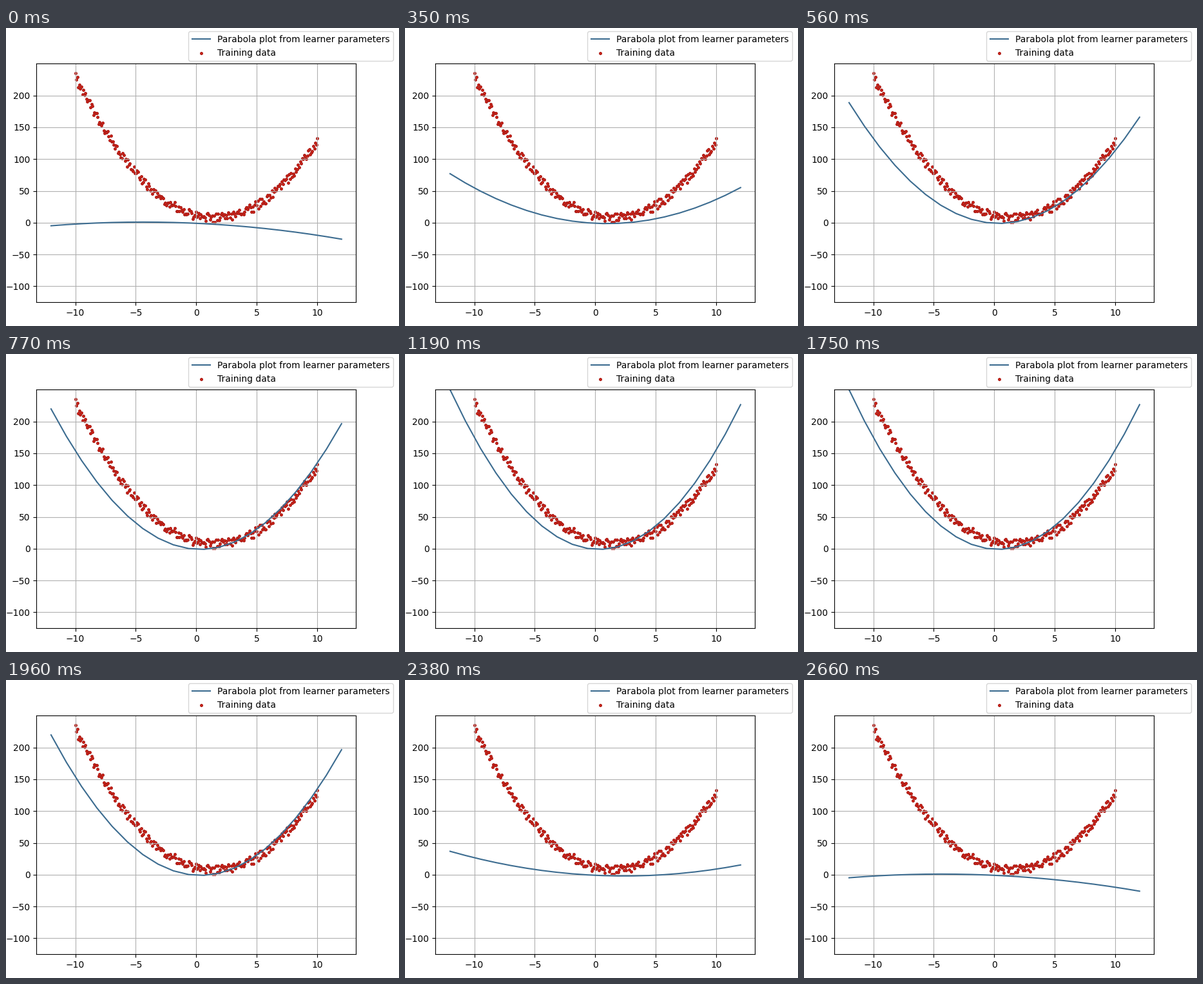
Write a matplotlib script that moves like this. It is 610 px wide and 462 px high and loops after 2730 ms.

```python
import numpy as np
import matplotlib.pyplot as plt
from matplotlib.animation import FuncAnimation

W, H, DPI = 610, 462, 100
FRAMES, INTERVAL = 39, 70
BLUE, RED, DARK_RED = "#3c6c90", "#cc2214", "#a81c1a"


def learning_step(n):
    """Learn forward with one pause, then rewind: fast first, slower later."""
    forward = n if n < 10 else n - 1
    rewind = max(38 - n, 2 * (33 - n))
    return min(forward, rewind)


def parabola(x, n):
    step = learning_step(n)
    growth = step ** 4.45 / (step ** 4.45 + 5.93 ** 4.45)
    a = -0.1 + 1.54 * growth + 0.015 * step
    b = -0.885 - 0.055 * a
    return a * x ** 2 + b * x - 1


def training_data(count=240):
    rng = np.random.default_rng(4)
    x = np.linspace(-10, 10, count)
    noise = rng.uniform(-7.3, 7.3, count)
    return x, 1.67 * x ** 2 - 5.05 * x + 11 + noise


fig = plt.figure(figsize=(W / DPI, H / DPI), dpi=DPI, facecolor="white")
ax = fig.add_axes([47.4 / W, 37 / H, 496 / W, 369.6 / H])
ax.set_xlim(-13.2, 13.2)
ax.set_ylim(-125, 250)
ax.set_xticks(range(-10, 11, 5))
ax.set_yticks(range(-100, 201, 50))
ax.grid(True)

xs = np.linspace(-12, 12, 20)
line, = ax.plot(xs, parabola(xs, 0), color=BLUE, lw=1.5,
                label="Parabola plot from learner parameters")
ax.scatter(*training_data(), s=8, color=RED, edgecolors=DARK_RED,
           linewidths=0.7, label="Training data")
ax.legend(loc="upper right", bbox_to_anchor=(601 / W, 457 / H),
          bbox_transform=fig.transFigure, borderaxespad=0)


def update(n):
    line.set_ydata(parabola(xs, n))
    return line,


anim = FuncAnimation(fig, update, frames=FRAMES, interval=INTERVAL,
                     repeat=True, repeat_delay=0)
plt.show()
```
